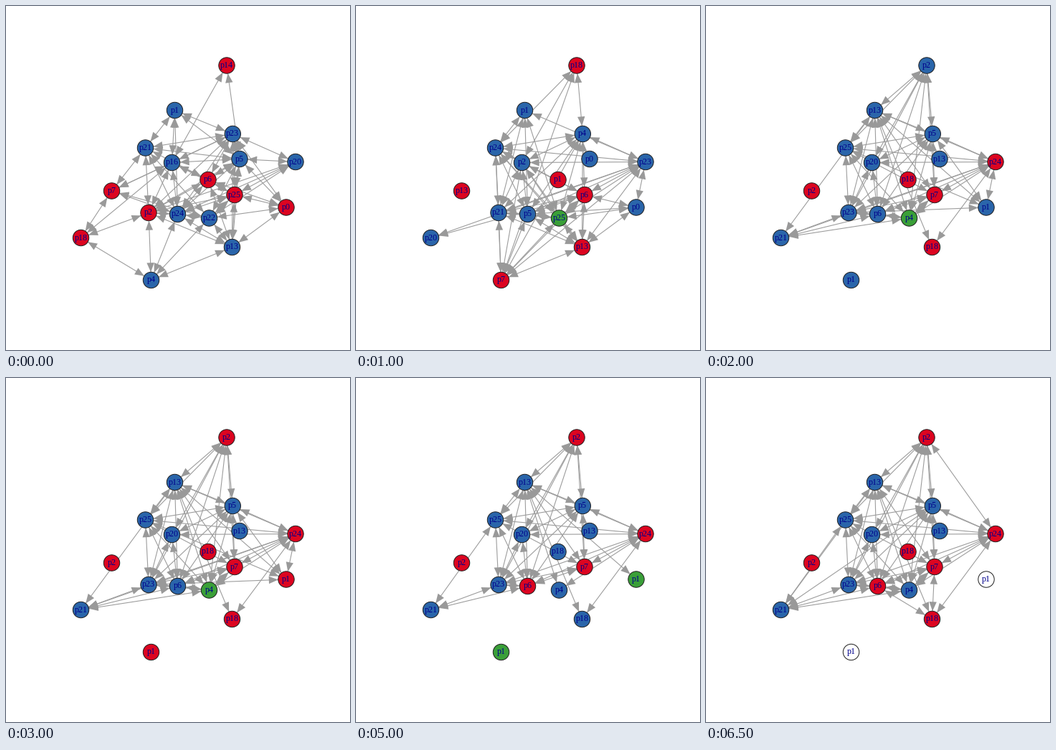
Animation of 480x480 px, one loop 7000 ms. Source, as a matplotlib script:

```python
from itertools import combinations, cycle

import numpy as np
import matplotlib.pyplot as plt
from matplotlib.animation import FuncAnimation
from matplotlib.collections import LineCollection, PolyCollection

SIZE, RADIUS, STEPS = 480, 11.2, 14
RED, BLUE, GREEN, WHITE = "#dc0520", "#2a65aa", "#3a9f38", "#ffffff"
SPOTS = np.array([
    (391, 281), (235.5, 145.5), (315.5, 336.5), (308, 83), (231.5, 218.5),
    (104.5, 323.5), (199, 288.5), (404, 217.5), (194.5, 198), (283.5, 296),
    (316.3, 178.5), (239.5, 290.5), (319, 263.5), (202.5, 382.5),
    (326, 213.5), (282, 242.5), (147.5, 258)])

# Peers fill the spots in alphabetical order; when some leave, the rest
# move up and the names start over on the unlinked spots at the end.
PEERS = sorted("0 1 2 4 5 6 7 13 14 16 18 20 21 22 23 24 25".split())
LEAVING = {"22": 1, "14": 2, "16": 2, "0": 4}

# Core peers all know each other. Peers named here know only their contacts
# from the given step on; "core" makes them core peers again.
CONTACTS = {
    0: {"0": "5 6 13 22 23 25", "1": "5 16 21 23 24", "14": "5 16",
        "16": "1 2 5 6 7 14 18 23 24 25", "18": "2 4 7 16",
        "20": "2 5 22 23 24 25", "21": "1 2 5 6 7 23 24",
        "22": "0 4 5 7 13 20 21 24 25", "4": "2 13 18 22 24",
        "7": "16 18 21 22 23 24"},
    1: {"1": "5 16 21 23 24 25", "14": "5 16 20 23 24", "18": "2 4 7 16 24",
        "20": "5 6 14 18 23", "21": "1 2 4 5 13 18 23 24 25",
        "4": "2 6 13 18 21 23 25", "7": "5 16 18 23 24"},
    2: {"20": "6 23", "21": "core", "4": "core", "7": "core"},
    4: {"1": "5 13 23 24 25", "18": "13 24", "20": "2 5 6 23 24",
        "21": "4 6 13 23 24", "2": "4 5 6 7 13 20 23 25"},
    7: {"1": "5 13 25", "21": "4 6 13 23 24 25"},
    9: {"1": "13", "21": "6 23 25", "4": "13 24", "2": "5 6 7 13 20 23 25"},
    11: {"1": ""},
    12: {"18": "6 7 13 24", "21": "4 5 6 13 23 25", "4": "core", "2": "core"},
}

# Spots are lettered a to q; each step flips some between blue and red.
FLIPS = ["adfgmpq", "adgimnpq", "cdfimpq", "n", "dh", "ahn", "dh", "dq",
         "l", "cp", "dq", "d", "p", "cd"]
MARKS = [("d", 1, 2, GREEN), ("j", 2, 9, GREEN), ("an", 9, 11, GREEN),
         ("an", 11, STEPS, WHITE)]


def spot(letter):
    return ord(letter) - ord("a")


def present(step):
    return [p for p in PEERS if step < LEAVING.get(p, STEPS)]


def contacts(step):
    known = {}
    for start, change in CONTACTS.items():
        if start <= step:
            known.update(change)
    return {p: s.split() for p, s in known.items() if s != "core"}


def links(step):
    known = contacts(step)
    for (i, a), (j, b) in combinations(enumerate(present(step)), 2):
        if a in known or b in known:
            linked = b in known.get(a, []) or a in known.get(b, [])
        else:
            linked = True
        if linked:
            yield SPOTS[i], SPOTS[j]


def colours(step):
    flips = "".join(FLIPS[:step + 1])
    fill = [RED if flips.count(chr(ord("a") + i)) % 2 else BLUE
            for i in range(len(SPOTS))]
    for letters, start, end, colour in MARKS:
        if start <= step < end:
            for letter in letters:
                fill[spot(letter)] = colour
    return fill


def arrow(tail, head):
    """Triangle with its tip on the rim of the head node."""
    along = (head - tail) / np.hypot(*(head - tail))
    side = np.array([-along[1], along[0]])
    tip = head - along * RADIUS
    base = tip - along * 13
    return [tip, base + side * 5.2, base - side * 5.2]


fig = plt.figure(figsize=(SIZE / 72, SIZE / 72), dpi=72, facecolor="white")
ax = fig.add_axes([0, 0, 1, 1])
ax.set(xlim=(0, SIZE), ylim=(SIZE, 0))
ax.axis("off")

line_art = LineCollection([], colors="#9c9c9c", linewidths=1.1, zorder=1)
head_art = PolyCollection([], facecolors="#999999", edgecolors="none", zorder=2)
ax.add_collection(line_art)
ax.add_collection(head_art)
dots = ax.scatter(*SPOTS.T, s=(2 * RADIUS) ** 2, edgecolors="#202020",
                  linewidths=1, zorder=3)
texts = [ax.text(x, y, "", family="Liberation Serif", size=12, color="#00008b",
                 ha="center", va="center", zorder=4) for x, y in SPOTS]


def draw(step):
    pairs = list(links(step))
    line_art.set_segments(pairs)
    head_art.set_verts([arrow(*ends) for p, q in pairs
                        for ends in ((p, q), (q, p))])
    dots.set_facecolor(colours(step))
    for text, peer in zip(texts, cycle(present(step))):
        text.set_text("p" + peer)
    return [line_art, head_art, dots, *texts]


anim = FuncAnimation(fig, draw, frames=STEPS, interval=500,
                     repeat=True, repeat_delay=0)
plt.show()
```
